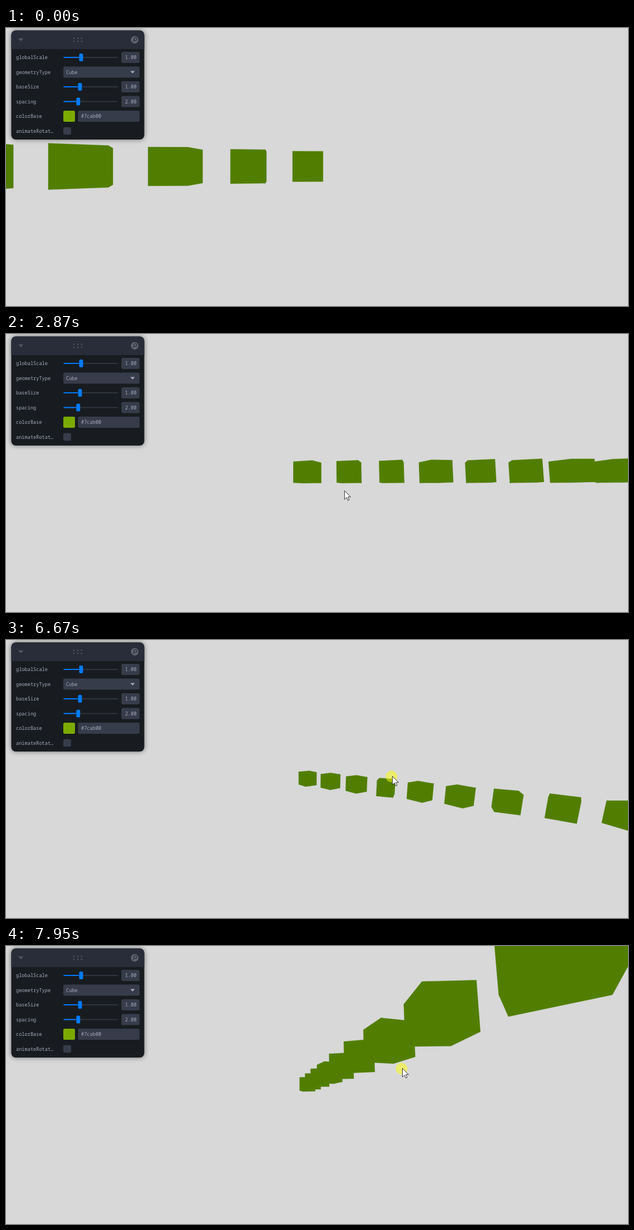
These frames come from a looping animation (1118 px wide and 501 px high, 8 s). An HTML page:

```html
<!DOCTYPE html>
<html lang="en">
<head>
<meta charset="utf-8">
<title>Row of cubes</title>
<style>
html, body { margin: 0; width: 100%; height: 100%; overflow: hidden; background: #d8d8d8; }
svg { display: block; width: 1118px; height: 501px; }
text { font: 8.65px "Noto Sans Mono", "DejaVu Sans Mono", monospace; fill: #a3a9bb; white-space: pre; }
#panel { filter: drop-shadow(0 0 4px rgba(0, 0, 0, .5)); }
</style>
</head>
<body>
<svg viewBox="0 0 1118 501" xmlns="http://www.w3.org/2000/svg">
  <rect width="1118" height="501" fill="#d8d8d8"/>
  <path id="cubes" fill="#517e00" stroke="#517e00" stroke-width=".4" stroke-linejoin="round"/>
  <g id="panel">
    <rect x="9.5" y="4.5" width="239" height="196.5" rx="8" fill="#181c20"/>
    <path d="M9.5 38V12.5a8 8 0 0 1 8-8h223a8 8 0 0 1 8 8V38Z" fill="#292d39"/>
    <path d="M22 18.700h9.200l-4.600 5.300Z" fill="#535760"/>
    <g id="dots" fill="#535760"></g>
    <circle cx="231.300" cy="21.200" r="6.800" fill="#60646f"/>
    <g fill="none" stroke="#292d39" stroke-width="1.200">
      <circle cx="232.500" cy="20" r="2.600"/>
      <path d="M230.600 21.900l-3 3"/>
    </g>
    <g id="rows"></g>
  </g>
  <g id="cursor">
    <circle id="press" cx="-1" cy="1" r="10.5" fill="#ff0" fill-opacity=".5"/>
    <path d="M.5 .5V16L4.200 12.600 6.600 18 9 17 6.700 11.700H11.500Z" fill="#fff" stroke="#222" stroke-width=".9"/>
  </g>
</svg>
<script>
const $ = id => document.getElementById(id);
const LOOP = 8000, FOCAL = 434, CX = 542, CY = 249.5, NEAR = 0.05, RAD = Math.PI / 180;

// ---- control panel ----
const GREY = '#373c4b', BLUE = '#007bff';
const box = (x, y, w, h, fill) =>
  `<rect x="${x}" y="${y}" width="${w}" height="${h}" rx="2.5" fill="${fill}"/>`;
const label = (x, y, s) => `<text x="${x}" y="${y + 3}">${s}</text>`;
const slider = (knob, value) => y =>
  box(103, y - 1, 99, 2, '#30343f') + box(103, y - 1, knob - 103, 2, BLUE) +
  box(knob, y - 7, 7, 14, BLUE) + box(207.5, y - 10, 32.5, 20, GREY) + label(214, y, value);
const rows = [
  ['globalScale', slider(131.5, '1.00')],
  ['geometryType', y => box(103, y - 10, 137, 20, GREY) + label(108, y, 'Cube') +
    `<path d="M223.5 ${y - 2}h8l-4 4.5Z" fill="#a3a9bb"/>`],
  ['baseSize', slider(129.5, '1.00')],
  ['spacing', slider(126.3, '2.00')],
  ['colorBase', y => box(103, y - 10, 21, 20, '#7cab00') +
    box(129.5, y - 10, 110.5, 20, GREY) + label(135, y, '#7cab00')],
  ['animateRotat…', y => box(103, y - 6.8, 14, 13.5, GREY)]
];
$('rows').innerHTML = rows.map(([name, control], i) => {
  const y = 53 + i * 26.5;
  return label(18, y, name) + control(y);
}).join('');
$('dots').innerHTML = [0, 1, 2, 3, 4, 5].map(i =>
  `<circle cx="${122 + i % 3 * 7}" cy="${i < 3 ? 18.5 : 24}" r="1.3"/>`).join('');

// ---- motion: key points [time, a, b] ----
const camera = [ // orbit and pitch in degrees
  [1050, 155, 0], [1600, 96, 3.5], [2200, 8, -4.3], [2700, 3.7, -4.3], [4110, 2.1, -6],
  [4450, 2.1, -6], [5000, 16, 5], [5950, -180, 3], [6670, 33.4, 10], [7150, 88, 5],
  [7340, 90.3, -2.3], [7950, 78.9, -5.9]
];
const pointer = [
  [600, 918, 484], [1050, 476, 298], [1600, 558, 296], [2200, 675, 281], [2800, 608, 282],
  [3090, 608, 282], [4110, 947, 223], [4450, 740, 240], [5950, 988, 255], [6670, 694, 245],
  [7340, 701, 204], [7950, 712, 220]
];

const slope = (k, i, c) => k[i] && k[i + 1] ? (k[i + 1][c] - k[i][c]) / (k[i + 1][0] - k[i][0]) : 0;
function tangent(k, i, c) {
  const a = slope(k, i - 1, c), b = slope(k, i, c);
  return a * b > 0 ? 2 * a * b / (a + b) : 0;
}
// smooth interpolation of column c that never overshoots its keys
function at(k, c, t) {
  const last = k[k.length - 1];
  if (t <= k[0][0]) return k[0][c];
  if (t >= last[0]) return last[c];
  const i = k.findIndex(p => p[0] > t) - 1;
  const h = k[i + 1][0] - k[i][0], s = (t - k[i][0]) / h, r = 1 - s;
  return r * r * (1 + 2 * s) * k[i][c] + s * s * (3 - 2 * s) * k[i + 1][c] +
    h * s * r * (r * tangent(k, i, c) - s * tangent(k, i + 1, c));
}
function ramp(t, from, to) {
  const s = Math.min(1, Math.max(0, (t - from) / (to - from)));
  return s * s * (3 - 2 * s);
}
// camera distance: each turn of the wheel multiplies it
const distance = t => 8.42 * 1.045 ** ramp(t, 1050, 1600) *
  1.326 ** ramp(t, 2200, 2700) * 1.6 ** ramp(t, 3700, 4220);

// ---- cubes ----
const yaws = [24, 17, 22, -9, 24, 29, -3, 14, -34, -22];
const faces = ['0231', '4576', '0154', '2673', '0462', '1375'].map(f => [...f].map(Number));

function corners(i, cam) {
  const a = (yaws[i] + cam.orbit) * RAD, o = cam.orbit * RAD, p = cam.pitch * RAD;
  return [0, 1, 2, 3, 4, 5, 6, 7].map(n => {
    const u = (n & 1) - 0.5, w = (n >> 1 & 1) - 0.5, y = (n >> 2) - 0.5;
    const x = 2 * i * Math.cos(o) + u * Math.cos(a) - w * Math.sin(a);
    const z = 2 * i * Math.sin(o) + u * Math.sin(a) + w * Math.cos(a);
    return [x, y * Math.cos(p) - z * Math.sin(p), cam.distance - z * Math.cos(p) - y * Math.sin(p)];
  });
}

function clip(poly) {
  const out = [];
  poly.forEach((p, i) => {
    const q = poly[(i + 1) % poly.length];
    if (p[2] >= NEAR) out.push(p);
    if ((p[2] >= NEAR) !== (q[2] >= NEAR)) {
      const s = (NEAR - p[2]) / (q[2] - p[2]);
      out.push(p.map((v, j) => v + (q[j] - v) * s));
    }
  });
  return out;
}

const project = ([x, y, z]) => [CX + FOCAL * x / z, CY - FOCAL * y / z];
const area = pts => pts.reduce((sum, p, i) => {
  const q = pts[(i + 1) % pts.length];
  return sum + p[0] * q[1] - q[0] * p[1];
}, 0);

function cubePath(cam) {
  let d = '';
  yaws.forEach((_, i) => {
    const c = corners(i, cam);
    for (const f of faces) {
      const pts = clip(f.map(n => c[n])).map(project);
      if (pts.length > 2 && area(pts) > 0)
        d += 'M' + pts.map(p => p[0].toFixed(2) + ' ' + p[1].toFixed(2)).join('L') + 'Z';
    }
  });
  return d;
}

function draw(t) {
  const cam = { orbit: at(camera, 1, t), pitch: at(camera, 2, t), distance: distance(t) };
  $('cubes').setAttribute('d', cubePath(cam));
  $('cursor').setAttribute('transform', `translate(${at(pointer, 1, t)} ${at(pointer, 2, t)})`);
  $('cursor').setAttribute('visibility', t < 600 ? 'hidden' : 'visible');
  const held = t > 1050 && t < 2200 || t > 4450;
  $('press').setAttribute('visibility', held ? 'inherit' : 'hidden');
}

const start = performance.now();
function tick() {
  draw((performance.now() - start) % LOOP);
  requestAnimationFrame(tick);
}
tick();
</script>
</body>
</html>
```
